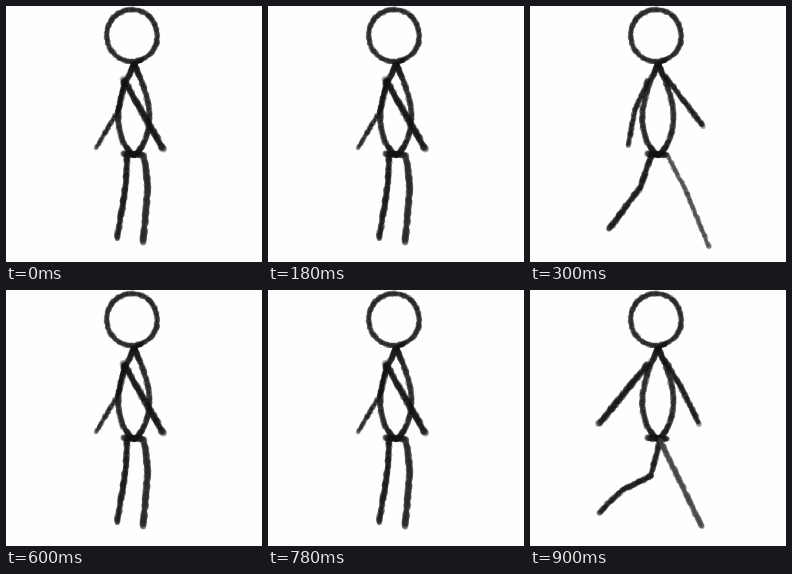
Write an HTML page with a canvas that moves like this. It is 256 px wide and 256 px high and loops after 1200 ms.

```html
<!DOCTYPE html>
<html lang="en">
<head>
<meta charset="utf-8">
<title>Walking stick figure</title>
<style>
html, body { margin: 0; height: 100%; overflow: hidden; background: #fefefe; }
canvas { display: block; }
</style>
</head>
<body>
<canvas id="stage" width="256" height="256"></canvas>
<script>
const ctx = document.getElementById('stage').getContext('2d');
const HOLD = 300;
const INK = '#151515', GREY = '#404040';

let seed;
function rand() {
  seed = (seed * 16807) % 2147483647;
  return seed / 2147483647;
}

// One dab of charcoal
function dab(x, y, width) {
  const jitter = () => (rand() - 0.5) * 1.4;
  ctx.globalAlpha = 0.35;
  ctx.beginPath();
  ctx.arc(x + jitter(), y + jitter(), width * (0.36 + rand() * 0.18), 0, 7);
  ctx.fill();
}

function line(width, color, ...points) {
  ctx.fillStyle = color;
  points.slice(1).forEach(([x2, y2], i) => {
    const [x1, y1] = points[i];
    const steps = Math.ceil(Math.hypot(x2 - x1, y2 - y1) / 0.8);
    for (let s = 0; s <= steps; s++) {
      const t = s / steps;
      dab(x1 + (x2 - x1) * t, y1 + (y2 - y1) * t, width);
    }
  });
}

function body() {
  ctx.fillStyle = '#1c1c1c';
  for (let a = 0; a < Math.PI * 2; a += 0.03)
    dab(126 + 25.3 * Math.cos(a), 29.5 + 26 * Math.sin(a), 5.6);
  // Pear outline: pointed at the neck, full at the hips
  for (let a = 0; a < Math.PI; a += 0.02) {
    const u = (1 - Math.cos(a)) / 2;
    const half = 15.5 * Math.sin(Math.PI * u ** 1.3) ** 0.65;
    for (const side of [-1, 1]) dab(128 + side * half, 59 + 90 * u, 6);
  }
  line(5, INK, [136, 53], [127, 60]);
  line(6.5, INK, [117, 148], [138, 149]);
}

const backShoulder = [118, 74], frontShoulder = [135, 70];
const backHip = [121, 150], frontHip = [138, 150], midHip = [130, 150];

function stand() {
  line(5, INK, backShoulder, [112, 105], [90, 142]);
  line(7, INK, backShoulder, [157, 143]);
  line(6.3, INK, backHip, [120, 178], [111, 233]);
  line(7, '#262626', frontHip, [142, 181], [137, 237]);
}

function stride() {
  line(5.5, INK, backShoulder, [105, 104], [98, 140]);
  line(6, INK, frontShoulder, [173, 120]);
  line(6.3, INK, backHip, [110, 182], [79, 223]);
  line(5, GREY, frontHip, [157, 187], [179, 241]);
}

function run() {
  line(7, INK, backShoulder, [69, 134]);
  line(6, INK, frontShoulder, [151, 97], [169, 134]);
  line(6, INK, midHip, [121, 186], [92, 200], [69, 223]);
  line(6, GREY, midHip, [146, 183], [172, 237]);
}

const poses = [stand, stride, stand, run];

function draw(pose) {
  seed = 4271;
  ctx.globalAlpha = 1;
  ctx.fillStyle = '#fefefe';
  ctx.fillRect(0, 0, 256, 256);
  body();
  pose();
}

let shown;
const start = performance.now();
function frame() {
  const pose = poses[Math.floor((performance.now() - start) / HOLD) % poses.length];
  if (pose !== shown) draw(shown = pose);
  requestAnimationFrame(frame);
}
frame();
</script>
</body>
</html>
```
